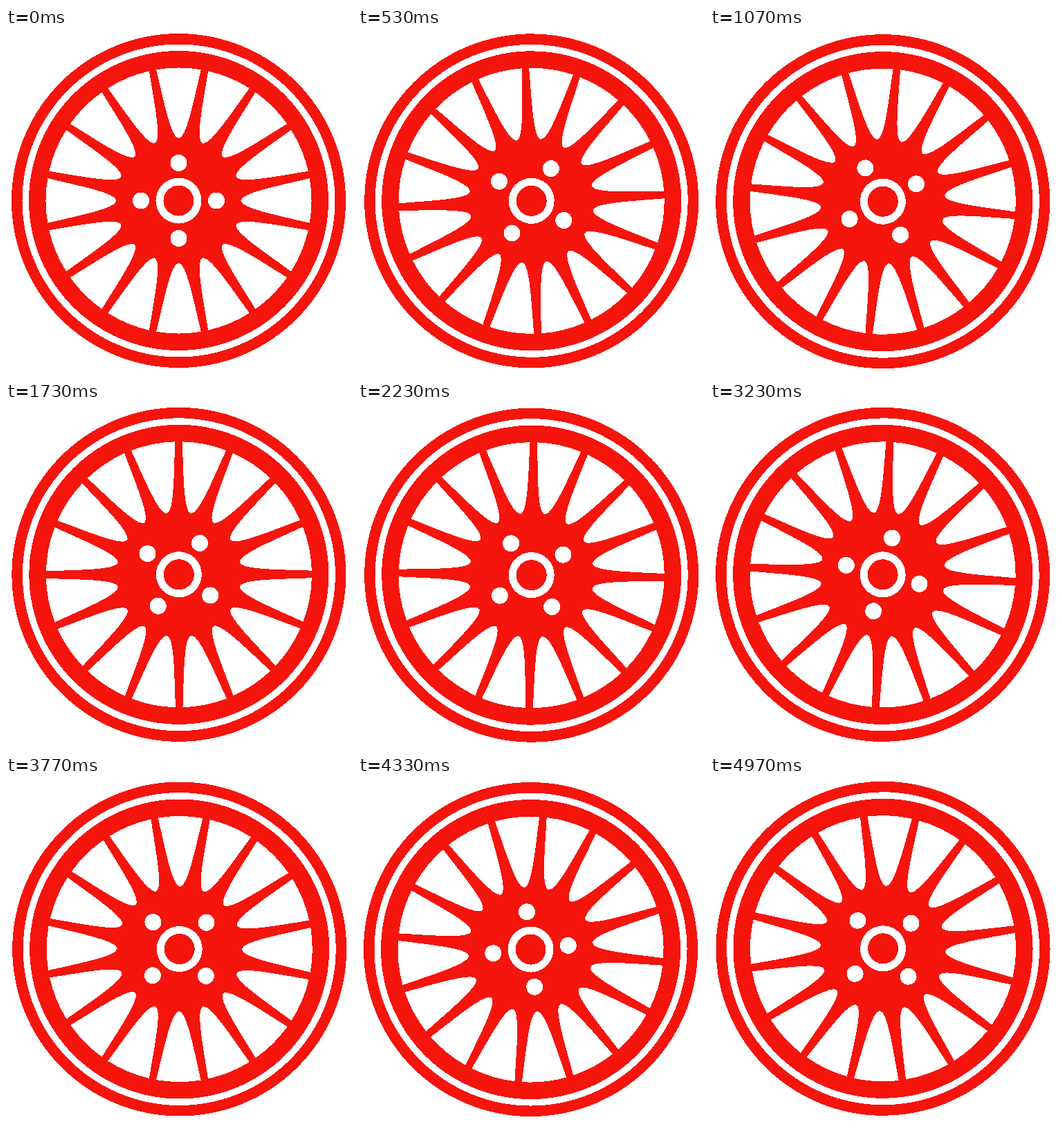
These frames come from a looping animation (500 by 500 pixels, 5010 ms). An HTML page:

```html
<!DOCTYPE html>
<html lang="en">
<head>
<meta charset="utf-8">
<title>Spinning wheel</title>
<style>
  html, body { margin: 0; width: 100%; height: 100%; overflow: hidden; background: #fff; }
  svg { display: block; width: 100%; height: 100%; shape-rendering: crispEdges; }
  .red { fill: #f5150d; }
  .white { fill: #fff; }
</style>
</head>
<body>
<svg viewBox="0 0 500 500"><g id="wheel"></g></svg>
<script>
const LOOP = 5010;
const LAST_STEP = 149;
const STEP_ANGLE = 7.57;
const SPOKES = 16;
const BOLTS = 4;
// The hub sits slightly off the pivot, so the rim wobbles as it turns.
const PIVOT = 250;
const HUB = 249.5;

const wheel = document.getElementById('wheel');

function add(tag, cls, attrs) {
  const el = document.createElementNS('http://www.w3.org/2000/svg', tag);
  el.setAttribute('class', cls);
  for (const key in attrs) el.setAttribute(key, attrs[key]);
  wheel.appendChild(el);
}

function disc(cls, r, cx = 0, cy = 0) {
  add('circle', cls, { r, cx, cy });
}

function build() {
  disc('red', 241.5);
  disc('white', 226);
  disc('red', 216.5);

  const gap = 'M-32.3 -189.3 A192 192 0 0 1 32.3 -189.3 ' +
    'C21 -142 11 -90 0 -90 C-11 -90 -21 -142 -32.3 -189.3Z';
  for (let i = 0; i < SPOKES; i++) {
    add('path', 'white', { d: gap, transform: `rotate(${i * 360 / SPOKES})` });
  }

  for (let i = 0; i < BOLTS; i++) {
    const a = i * 2 * Math.PI / BOLTS;
    disc('white', 12, 54.5 * Math.sin(a), -54.5 * Math.cos(a));
  }
  disc('white', 33);
  disc('red', 22);
}

// Thirty steps a second, with each change rounded to 10 ms.
function stepAt(ms) {
  const tick = Math.floor(ms / 10) * 10;
  return Math.min(LAST_STEP, Math.floor((tick + 5) * 0.03));
}

function draw() {
  const angle = stepAt(performance.now() % LOOP) * STEP_ANGLE;
  wheel.setAttribute('transform',
    `rotate(${angle} ${PIVOT} ${PIVOT}) translate(${HUB} ${HUB})`);
  requestAnimationFrame(draw);
}

build();
draw();
</script>
</body>
</html>
```
